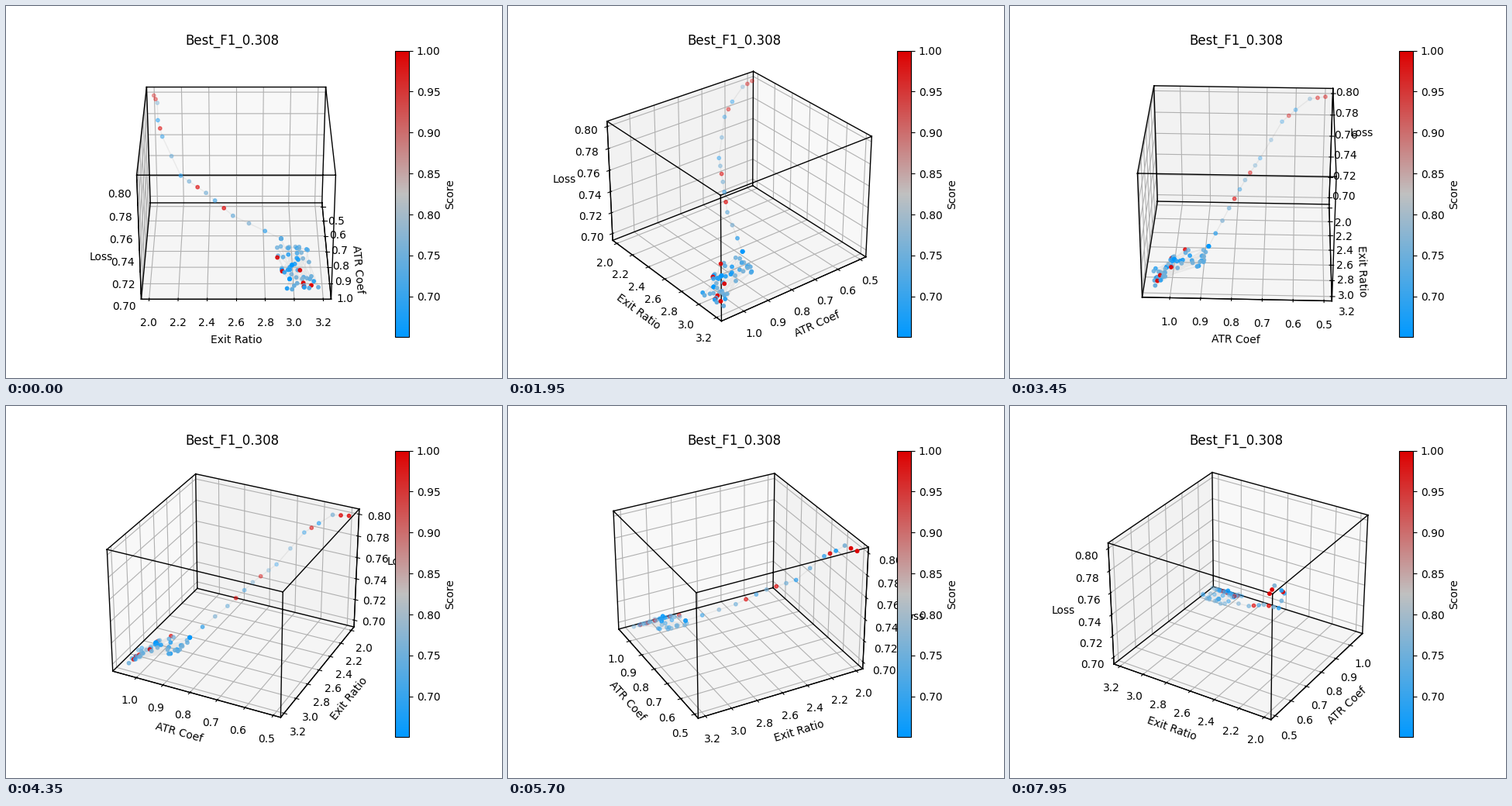
A matplotlib script that plays this animation: 640x480 px, repeating every 8 s.

```python
from itertools import combinations, product

import matplotlib.pyplot as plt
import numpy as np
from matplotlib.animation import FuncAnimation
from matplotlib.colors import LinearSegmentedColormap

LOOP_MS, TICK_MS, HOLD_TICKS = 8000, 50, 3
DEGREES_PER_STEP = 4
ATR_LIM, EXIT_LIM, LOSS_LIM = (0.4743, 1.0902), (1.9455, 3.2545), (0.6934, 0.8047)
LOW_SCORE, HIGH_SCORE = 0.6505, 1.0

rng = np.random.default_rng(4)


def mixed_scores(count):
    return rng.uniform(0.67, 0.77, count)


def search_path():
    """Early trials: a descent from the start corner through a few key points."""
    trial = np.arange(17)
    key_trials = [0, 2, 3, 5, 7, 10, 13, 16]
    atr = np.interp(trial, key_trials, [0.5, 0.553, 0.601, 0.647, 0.72, 0.769, 0.82, 0.881])
    exit_ratio = np.interp(trial, key_trials, [2.0, 2.03, 2.036, 2.07, 2.203, 2.385, 2.577, 2.918])
    loss = np.interp(trial, key_trials, [0.8, 0.7996, 0.7896, 0.7804, 0.7538, 0.7445, 0.7303, 0.7177])
    score = mixed_scores(len(trial))
    score[[0, 1, 4, 9, 12]] = HIGH_SCORE
    return np.column_stack([atr, exit_ratio, loss, score])


def settled_cluster(count=50, high_share=0.28):
    """Late trials: a loss plateau that drops once the ATR coefficient nears 1."""
    atr = 1.064 - 0.18 * rng.random(count) ** 1.5
    drop = np.clip((atr - 0.97) / 0.08, 0, 1)
    exit_ratio = rng.uniform(2.87, 3.12, count) + 0.08 * drop
    loss = 0.712 - 0.0138 * drop
    is_high = (rng.random(count) < high_share) & (atr > 0.92)
    score = np.where(is_high, HIGH_SCORE, mixed_scores(count))
    return np.column_stack([atr, exit_ratio, loss, score])


def repeated_trials(times=3):
    favourites = [(0.881, 2.918, 0.7177), (0.993, 2.988, 0.7099), (1.020, 2.972, 0.7011)]
    return np.array([(*point, LOW_SCORE) for point in favourites for _ in range(times)])


def box_edges():
    """All twelve edges of the plot box as one line with gaps."""
    path = []
    for a, b in combinations(product(ATR_LIM, EXIT_LIM, LOSS_LIM), 2):
        if sum(p != q for p, q in zip(a, b)) == 1:
            path += [a, b, (np.nan,) * 3]
    return np.array(path).T


atr, exit_ratio, loss, score = np.vstack(
    [search_path(), repeated_trials(), settled_cluster()]).T
cmap = LinearSegmentedColormap.from_list("score", ["#0099ff", "#c0c0c0", "#dd0000"])

fig = plt.figure(figsize=(6.4, 4.8), dpi=100)
ax = fig.add_subplot(projection="3d")
ax.plot(atr, exit_ratio, loss, color="gray", alpha=0.12, linewidth=1)
ax.plot(*box_edges(), color="black", linewidth=1)
dots = ax.scatter(atr, exit_ratio, loss, c=score, s=10, cmap=cmap,
                  vmin=LOW_SCORE, vmax=HIGH_SCORE)
fig.colorbar(dots, ax=ax, label="Score")

ax.set(title="Best_F1_0.308", xlabel="ATR Coef", ylabel="Exit Ratio", zlabel="Loss",
       xlim=ATR_LIM, ylim=EXIT_LIM, zlim=LOSS_LIM)


def update(tick):
    ax.view_init(elev=30, azim=DEGREES_PER_STEP * (tick // HOLD_TICKS))
    return ()


animation = FuncAnimation(fig, update, frames=LOOP_MS // TICK_MS, interval=TICK_MS,
                          repeat=True, repeat_delay=0)
plt.show()
```
